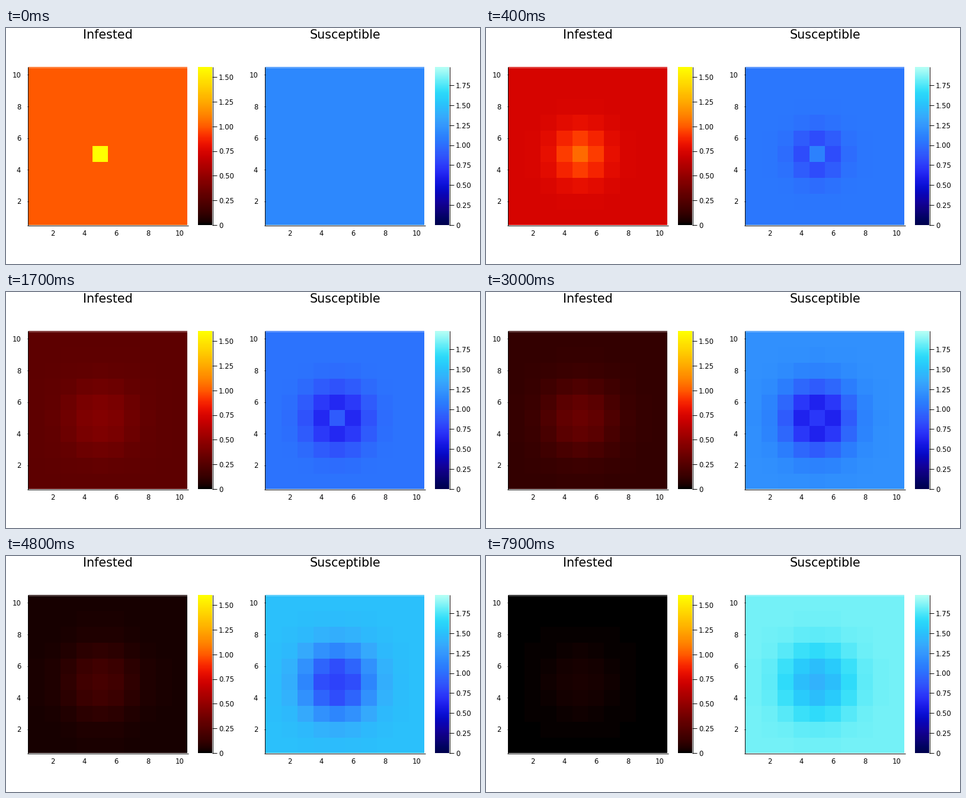
Animation, 800 px wide and 400 px high, one loop 8000 ms. Source, as a matplotlib script:

```python
import numpy as np
import matplotlib.pyplot as plt
from matplotlib.animation import FuncAnimation
from matplotlib.colors import ListedColormap

W, H, DPI = 800, 400, 100
FRAMES, STEP = 80, 100
N, SIDE = 10, 268
I_MAX, S_MAX = 1.603, 1.979


def linear(c):
    return np.where(c <= 0.04045, c / 12.92, ((c + 0.055) / 1.055) ** 2.4)


def gamma(c):
    c = np.clip(c, 0, 1)
    return np.where(c <= 0.0031308, c * 12.92, 1.055 * c ** (1 / 2.4) - 0.055)


def rounded(x, xp, fp):
    """Interpolation whose corners are rounded by a sliding mean."""
    half = np.minimum(5, np.minimum(x - x[0], x[-1] - x))
    near = x[:, None] + half[:, None] * np.linspace(-1, 1, 41)
    return np.interp(near, xp, fp).mean(1)


def fire_map():
    """Black - red - yellow with evenly rising lightness."""
    path = np.array([[0, 0, 0], [0.85, 0, 0], [1, 0.15, 0], [1, 1, 0]])
    u = np.linspace(0, 3, 3000)
    rgb = np.stack([np.interp(u, range(4), path[:, k]) for k in range(3)], 1)
    y = linear(rgb) @ [0.2126, 0.7152, 0.0722]
    light = np.where(y > 0.008856, 116 * np.cbrt(y) - 16, 903.3 * y)
    want = np.linspace(0, light[-1], 256)
    return ListedColormap(np.stack(
        [rounded(want, light, rgb[:, k]) for k in range(3)], 1))


def blue_map():
    """Navy - blue - pale cyan along the blue edge of CIELAB."""
    knots = np.arange(5, 96, 10)
    a = [31, 50, 65, 70, 45, 20, 0, -22, -38, -25]
    b = [-45, -66, -90, -100, -85, -70, -53, -37, -20, -3]
    light = np.linspace(5, 95, 256)
    fy = (light + 16) / 116
    f = np.stack([fy + rounded(light, knots, a) / 500, fy,
                  fy - rounded(light, knots, b) / 200], 1)
    xyz = np.where(f > 6 / 29, f ** 3, (f - 4 / 29) * 108 / 841)
    xyz = xyz * [0.9505, 1, 1.0888]
    to_rgb = np.array([[3.2406, -1.5372, -0.4986],
                       [-0.9689, 1.8758, 0.0415],
                       [0.0557, -0.2040, 1.0570]])
    return ListedColormap(gamma(xyz @ to_rgb.T))


# Distance of every cell from cell (5, 5) on a wrapped grid
gap = np.abs(np.arange(1, N + 1) - 5)
gap = np.minimum(gap, N - gap)
RADIUS = np.hypot(gap[:, None], gap[None, :])
TINY = 1e-9


def infested_far(t):
    return np.exp(-0.0755 * t / (1 + 0.0016 * t))


def susceptible_far():
    """Logistic growth held back by the infested, at every step."""
    s, out = 1.155, []
    for t in range(FRAMES):
        out.append(s)
        s *= np.exp(0.047 * (1 - s / 2) - 0.051 * infested_far(t + 0.5))
    return out


S_FAR = susceptible_far()


def infested_at(t):
    # The first peak fades while a broad outbreak takes over
    peak = 0.47 * np.exp(-t / 12) + 2.15 * t ** 3 / (t ** 3 + 31 ** 3)
    width = 2.9 * t / (t + 3) + TINY
    power = 1.3 + 1.4 * t / (t + 4)
    return infested_far(t) * np.exp(peak * np.exp(-(RADIUS / width) ** power))


def susceptible_at(t):
    # A growing hollow, at first sparing the middle cell
    depth = 0.9 * (1 - np.exp(-2 * t)) / (1 + ((t - 36) / 28) ** 2)
    spread = 4.2 * t / (t + 4) + TINY
    spared = 1.2 * np.exp(-(t / 29) ** 1.5) * (RADIUS == 0)
    return S_FAR[t] * np.exp(depth * (spared - np.exp(-RADIUS ** 2 / spread)))


fig = plt.figure(figsize=(W / DPI, H / DPI), dpi=DPI, facecolor="white")
ax = fig.add_axes([0, 0, 1, 1])
ax.axis("off")

pixel = np.arange(SIDE) * N // SIDE


def enlarge(cells):
    return cells[::-1][pixel][:, pixel]


def text(x, y, s, px, ha):
    # y is the middle of the digits or capitals
    ax.text(x, y + 0.365 * px, s, fontsize=px * 72 / DPI, ha=ha,
            va="baseline", family="DejaVu Sans", color="black")


def line(xs, ys, color="black", alpha=1):
    # Just under one pixel wide, so that it snaps to whole pixels
    ax.plot(xs, ys, color=color, alpha=alpha, lw=0.7,
            solid_capstyle="butt", zorder=3)


def image(data, cmap, top, left, right):
    return ax.imshow(data, cmap=cmap, vmin=0, vmax=top,
                     extent=(left, right, 334, 66),
                     interpolation="nearest", aspect="auto")


def panel(x0, title, cmap, top, ticks):
    left, right, y0, y1 = x0 + 38, x0 + 306, 334, 66
    cell = SIDE / N
    cells = image(np.zeros((SIDE, SIDE)), cmap, top, left, right)
    image(np.linspace(1, 0, SIDE)[:, None], cmap, 1, x0 + 324, x0 + 348)
    line([left, right], [66.5] * 2, "white", 0.5)
    text(x0 + 172.3, 10.7, title, 20.7, "center")
    line([x0 + 36.5] * 2, [66, 335])
    line([x0 + 36, x0 + 308], [334.5] * 2)
    for n in range(2, N + 1, 2):
        y = y0 - (n - 0.5) * cell
        line([x0 + 36, x0 + 38], [y, y])
        text(x0 + 25.3, y + 0.4, str(n), 11.6, "right")
        text(left + (n - 0.5) * cell + 0.6, 348, str(n), 11.6, "center")
    line([x0 + 348.5] * 2, [66, 334.5])
    for k in range(ticks):
        v = k * 0.25
        y = y0 - v / top * (y0 - y1)
        line([x0 + 348, x0 + 356], [y, y])
        text(x0 + 359, y + 0.6, f"{v:.2f}" if k else "0", 11.6, "left")
    return cells


infested = panel(0, "Infested", fire_map(), I_MAX, 7)
susceptible = panel(400, "Susceptible", blue_map(), S_MAX, 8)
ax.set_xlim(0, W)
ax.set_ylim(H, 0)


def draw(i):
    infested.set_data(enlarge(infested_at(i)))
    susceptible.set_data(enlarge(susceptible_at(i)))
    return infested, susceptible


anim = FuncAnimation(fig, draw, frames=FRAMES, interval=STEP,
                     repeat=True, repeat_delay=0)
plt.show()
```
